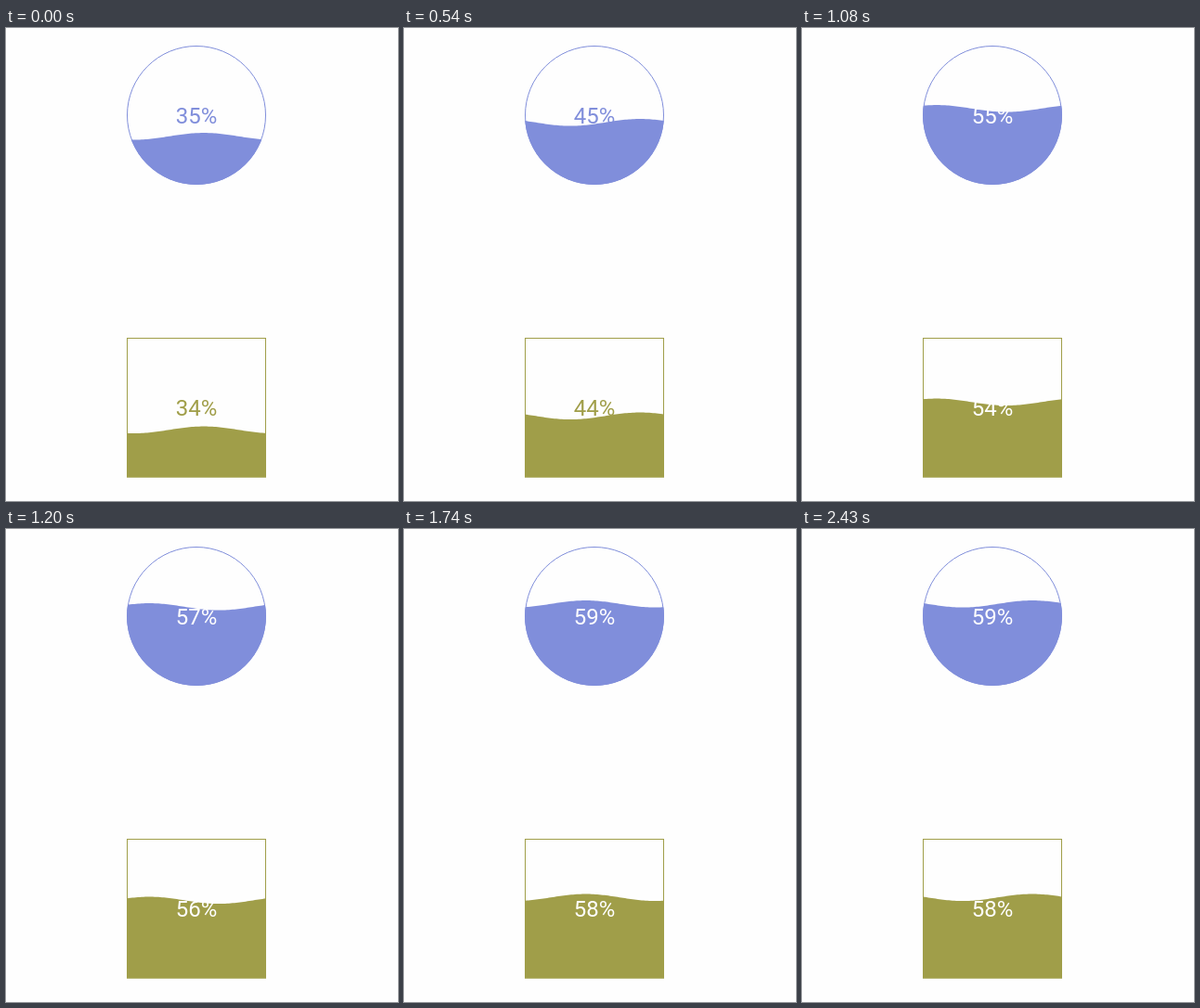
Recreate the animation shown at these times as an HTML page. Size 422x510 px, loop 2470 ms.

```html
<!DOCTYPE html>
<html lang="en">
<head>
<meta charset="utf-8">
<title>Liquid gauges</title>
<style>
  html, body { margin: 0; width: 100%; height: 100%; overflow: hidden; background: #fefefe; }
  svg { display: block; width: 422px; height: 510px; }
  text { font: 400 24px Roboto, Arial, sans-serif; text-anchor: middle; }
  .round { --tone: #808edb; }
  .square { --tone: #a09e49; }
  .wave { fill: var(--tone); }
  .rim { fill: none; stroke: var(--tone); stroke-width: 1; }
  .label { fill: var(--tone); }
  .label.inside { fill: #fefefe; }
</style>
</head>
<body>
<svg viewBox="0 0 422 510">
  <defs>
    <clipPath id="disc"><circle cx="205" cy="94" r="75"/></clipPath>
    <clipPath id="box"><rect x="130" y="334" width="150" height="150.5"/></clipPath>
  </defs>
  <g class="round">
    <path class="wave" clip-path="url(#disc)"/>
    <circle class="rim" cx="205" cy="94" r="74.5"/>
    <text class="label" x="205" y="103"></text>
  </g>
  <g class="square">
    <path class="wave" clip-path="url(#box)"/>
    <rect class="rim" x="130.5" y="334.5" width="149" height="149.5"/>
    <text class="label" x="205" y="418"></text>
  </g>
</svg>
<script>
  const LOOP = 2470, LEFT = 130, SIZE = 150;
  const AMP = 3.75, SPEED = 0.0761, CREST = 213;
  // moments at which the picture refreshes, and the rising percentage
  const ticks = [0, 120, 240, 390, 540, 690, 840, 960, 1080, 1200, 1320,
    1470, 1590, 1740, 1890, 2010, 2130, 2280, 2430];
  const levels = [35, 37, 39, 43, 45, 48, 51, 53, 55, 57, 59];

  function gauge(name, top, offset) {
    const root = document.querySelector('.' + name);
    const wave = root.querySelector('.wave');
    const label = root.querySelector('.label');
    return (level, crest) => {
      const pct = level + offset;
      const mid = top + SIZE * (1 - pct / 100);
      let d = `M${LEFT} ${top + SIZE + 2}`;
      for (let x = LEFT; x <= LEFT + SIZE; x += 2) {
        const y = mid - AMP * Math.cos((x - crest) / SIZE * 2 * Math.PI);
        d += `L${x} ${y.toFixed(2)}`;
      }
      wave.setAttribute('d', d + `V${top + SIZE + 2}Z`);
      label.textContent = pct + '%';
      label.classList.toggle('inside', pct >= 50);
    };
  }

  const gauges = [gauge('round', 19.3, 0), gauge('square', 334.3, -1)];
  let shown = -1;

  function draw(time) {
    const t = time % LOOP;
    const step = ticks.findLastIndex(at => at <= t);
    if (step === shown) return;
    shown = step;
    const level = levels[Math.min(step, levels.length - 1)];
    const crest = CREST + SPEED * ticks[step];
    gauges.forEach(paint => paint(level, crest));
  }

  const start = performance.now();
  function loop(now) {
    draw(Math.max(0, now - start));
    requestAnimationFrame(loop);
  }
  draw(0);
  requestAnimationFrame(loop);
</script>
</body>
</html>
```
